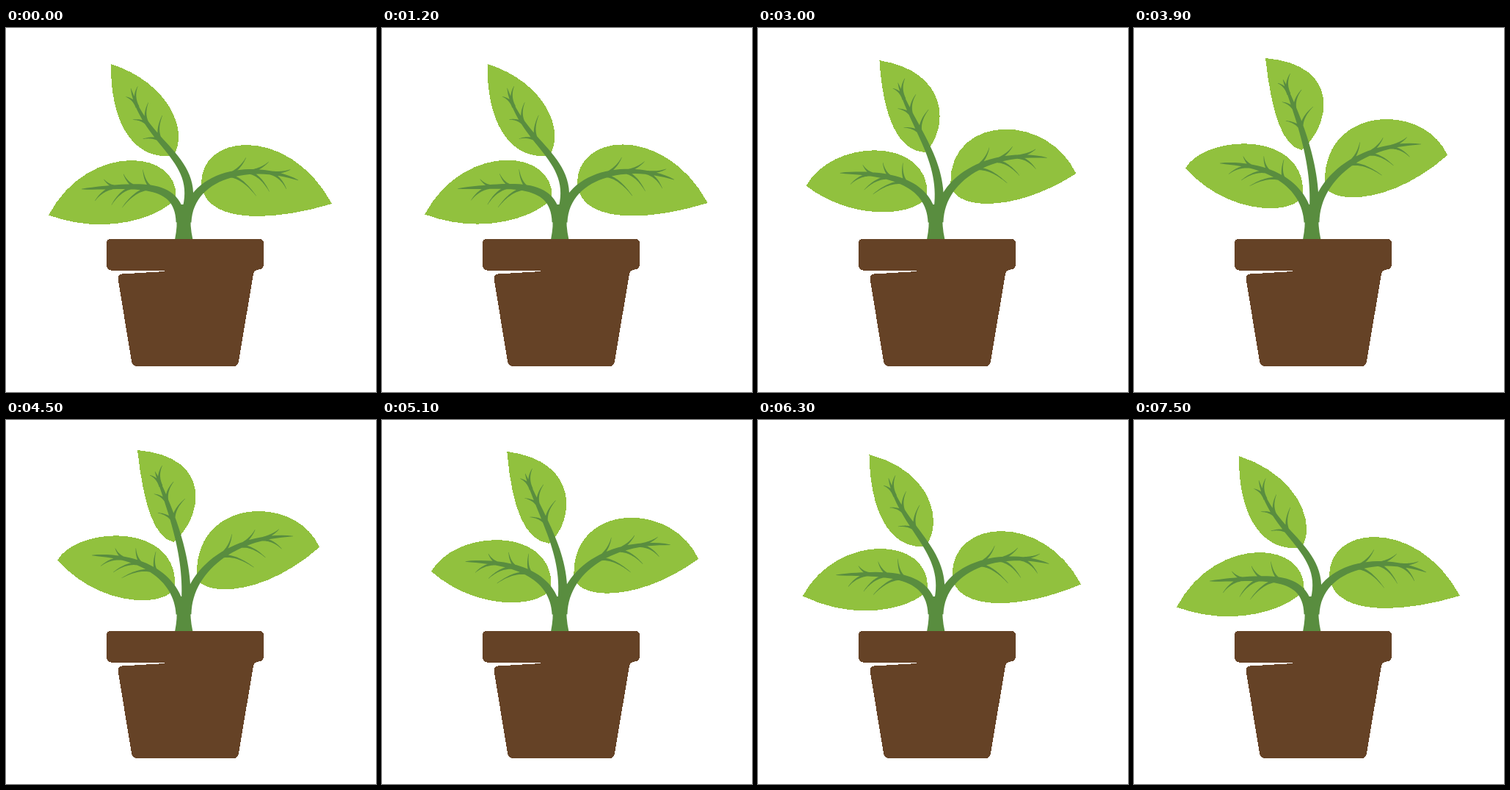
An HTML page that plays this animation: 504 px wide and 495 px high, repeating every 8700 ms.

```html
<!DOCTYPE html>
<html lang="en">
<head>
<meta charset="utf-8">
<title>Potted plant</title>
<style>
  html, body { margin: 0; width: 100%; height: 100%; overflow: hidden; background: #fff; }
  svg { display: block; width: 100%; height: 100%; }
</style>
</head>
<body>
<svg viewBox="0 0 504 495">
  <path id="leaves" fill="#91c13e" shape-rendering="crispEdges"/>
  <g fill="#598d3f">
    <path d="M230 288Q234 268 232 254L237 240H252V252Q250 268 254.500 288Z"/>
    <path id="stems"/>
  </g>
  <path fill="#654226" shape-rendering="crispEdges" d="M143 287H345Q351 287 351 293V321Q351 328 344 328.500Q338 329.500 337 334L317 453Q316 460 310 460H179Q172 460 171 453L152.500 341Q152 335 158 334.500L216 331V329.500H143Q137 329 137 322V293Q137 287 143 287Z"/>
</svg>
<script>
const LOOP = 8700, HOLD = 1200, STEP = 300, TOP = 11;

// Each leaf edge and midrib is one cubic, keyed in a drooping and a raised pose.
// A leaf is base, two edge controls, tip, then two controls back along the other edge.
// Twigs are [reach along the midrib, reach sideways], one for each side.
const branches = [
  {
    leaf: { low:  [231.5,230, 234,163, 110,156, 58,254.5, 148,287, 222,249],
            high: [230,228, 236,138, 98,144, 70,190.5, 126,254, 216,256] },
    rib: { low: [238,264, 235,205, 175,215, 103,219], high: [238,264, 234,216, 189,184, 117,184] },
    firstTwig: 0.45, twigs: [[23, -22], [38, 35]]
  },
  {
    leaf: { low:  [266,212, 265,142, 386,132, 444,239, 350,267, 270,262],
            high: [260,212, 256,105, 395,100, 427,173, 345,245, 262,238] },
    rib: { low: [246,264, 250,198, 335,181, 398,207], high: [246,264, 248,202, 313,156, 391,158] },
    firstTwig: 0.48, twigs: [[37, 15], [34, -39]]
  },
  {
    leaf: { low:  [228,174, 250,140, 221,74, 143,49, 142,127, 172,180],
            high: [228,166, 266,136, 286,50, 179,41, 188,120, 203,160] },
    rib: { low: [245,252, 268,176, 189,160, 170,82], high: [245,252, 249,185, 225,125, 203,70] },
    firstTwig: 0.58, twigs: [[29, -24], [22, 17]]
  }
];

const mix = ({ low, high }, s) => low.map((v, i) => v + (high[i] - v) * s);
const samples = (n, fn) => Array.from({ length: n + 1 }, (_, i) => fn(i / n));

function cubic([ax, ay, bx, by, cx, cy, dx, dy], t) {
  const r = 1 - t;
  const blend = (a, b, c, d) => r*r*r*a + 3*r*r*t*b + 3*r*t*t*c + t*t*t*d;
  return { x: blend(ax, bx, cx, dx), y: blend(ay, by, cy, dy) };
}

// Outline of a tapering cubic stroke.
function taper(curve, widthAt) {
  const left = [], right = [];
  samples(30, t => {
    const p = cubic(curve, t);
    const a = cubic(curve, t - 0.005), b = cubic(curve, t + 0.005);
    const dx = b.x - a.x, dy = b.y - a.y;
    const k = widthAt(t) / 2 / Math.hypot(dx, dy);
    left.push(`${(p.x + dy * k).toFixed(2)} ${(p.y - dx * k).toFixed(2)}`);
    right.unshift(`${(p.x - dy * k).toFixed(2)} ${(p.y + dx * k).toFixed(2)}`);
  });
  return "M" + left.concat(right).join("L") + "Z";
}

// A twig leaves the midrib along its direction, then bends to the side.
function twig(rib, t, along, side) {
  const p = cubic(rib, t), q = cubic(rib, t + 0.02);
  const len = Math.hypot(q.x - p.x, q.y - p.y);
  const tx = (q.x - p.x) / len, ty = (q.y - p.y) / len;
  const at = (a, b) => [p.x + tx * a + ty * b, p.y + ty * a - tx * b];
  const curve = [...at(0, 0), ...at(along * 0.4, 0), ...at(along * 0.75, side * 0.35), ...at(along, side)];
  return taper(curve, u => 4.8 * (1 - u) + 0.4);
}

function stemPath({ rib, firstTwig, twigs }, s) {
  const curve = mix(rib, s);
  let d = taper(curve, t => 12.5 * (1 - t) ** 0.58 + 0.4);
  for (let i = 0; i < 3; i++) {
    for (const [along, side] of twigs) {
      d += twig(curve, firstTwig + 0.15 * i, along * (1 - 0.06 * i), side * (1 - 0.25 * i));
    }
  }
  return d;
}

function leafPath({ leaf }, s) {
  const p = mix(leaf, s);
  return `M${p[0]} ${p[1]}C${p.slice(2).join(" ")} ${p[0]} ${p[1]}Z`;
}

function draw(id, shape, s) {
  document.getElementById(id).setAttribute("d", branches.map(b => shape(b, s)).join(""));
}

// The leaves rise in held steps and sink back through the same poses.
function poseAt(time) {
  const t = time % LOOP;
  const n = t < HOLD ? 0 : Math.floor((t - HOLD) / STEP) + 1;
  return Math.max(0, n > TOP ? 2 * TOP - n : n);
}

const swing = n => 1 - Math.cos(Math.PI * n / 13.7);
let shown = -1;

function render(time) {
  const pose = poseAt(time);
  if (pose !== shown) {
    const s = swing(pose) / swing(10);
    draw("leaves", leafPath, s);
    draw("stems", stemPath, s);
    shown = pose;
  }
  requestAnimationFrame(render);
}
render(0);
</script>
</body>
</html>
```
